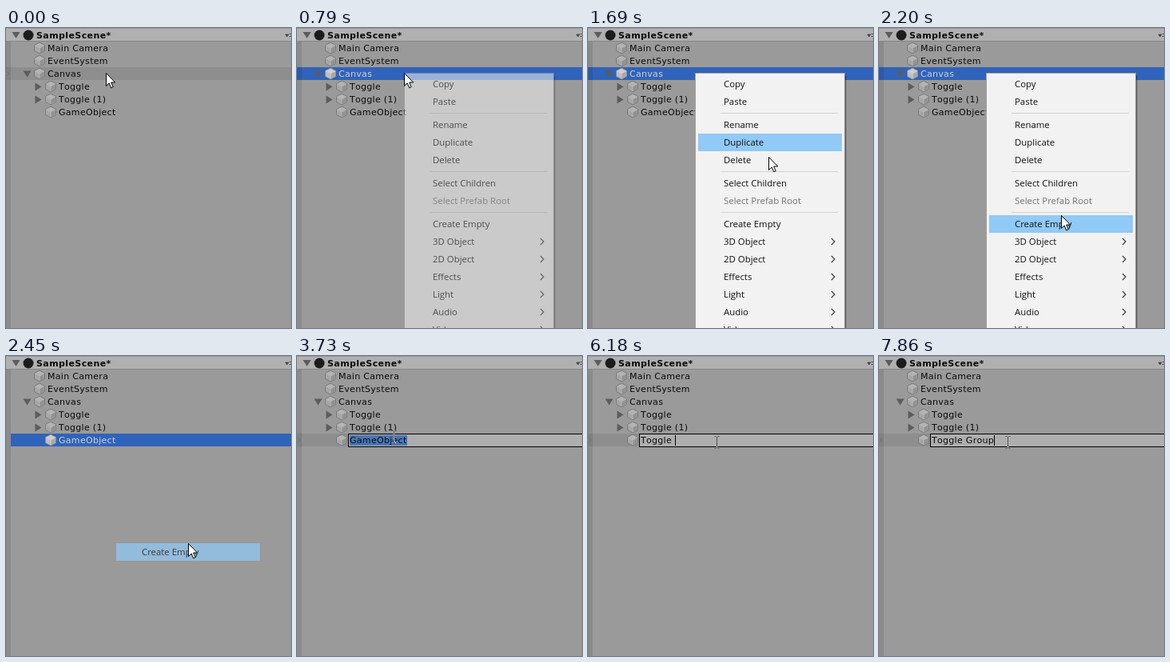
Write an HTML page that moves like this. It is 357x375 px and loops after 8 s.

```html
<!DOCTYPE html>
<html lang="en">
<head>
<meta charset="utf-8">
<title>Creating a toggle group</title>
<style>
  html, body { margin: 0; width: 100%; height: 100%; overflow: hidden; background: #9a9a9a; }
  #stage { position: relative; width: 357px; height: 375px; overflow: hidden; background: #9a9a9a; isolation: isolate; }
  svg { position: absolute; left: 0; top: 0; }
  #tree, #field { font: 11px "DejaVu Sans", sans-serif; letter-spacing: .3px; font-kerning: none; }
  #tree .scene { font-weight: bold; letter-spacing: .4px; }
  #menu { font: 11.4px "Open Sans", sans-serif; }
  #field {
    position: absolute; left: 64px; top: 97px; width: 300px; height: 15px;
    border: 1px solid #000; background: #aeaeae; color: #0a0a0a;
    white-space: pre; line-height: 15px;
  }
  #field span { position: absolute; left: 1px; top: 1px; height: 13px; line-height: 14px; }
  #field .picked { background: #4a78b6; }
  #field .typed { border-right: 1px solid #000; }
  #ibeam { mix-blend-mode: difference; }
</style>
</head>
<body>
<div id="stage">
  <svg id="tree" width="357" height="375"></svg>
  <div id="field"><span></span></div>
  <svg id="menu" width="357" height="375"></svg>
  <svg id="ibeam" width="357" height="375">
    <path d="M-3 -7.5H-1M1 -7.5H3M0 -7V7M-3 7.5H-1M1 7.5H3" transform="translate(.5 0)" fill="none" stroke="#fff"/>
  </svg>
  <svg id="arrow" width="357" height="375">
    <path d="M.5 .5V16.5L4.2 13L6.7 18.8L9.2 17.7L6.7 12H11.7Z" fill="#fff" stroke="#000" stroke-linejoin="round"/>
  </svg>
</div>
<script>
const $ = id => document.getElementById(id);
const LOOP = 8000;
const ROW = 16, TOP = 17;
const rowTop = i => TOP + ROW * i;

// Timelines: [start ms, value...]; each value holds until the next entry.
const pointer = [
  [0, 125, 56], [250, 120, 56], [370, 115, 56], [520, 124, 56], [640, 134, 56],
  [910, 137, 58], [1030, 142, 61], [1150, 190, 160], [1270, 240, 294], [1420, 240, 278],
  [1570, 233, 202], [1690, 226, 161], [1840, 226, 182], [1960, 227, 222], [2080, 229, 259],
  [2200, 228, 234], [2750, 121, 81], [2900, 121, 90], [3020, 121, 99],
  [3730, 121, 101], [3880, 135, 108], [4030, 159, 108], [4180, 161, 108]
];
const hoverRow = [[0, 2], [2450, -1], [2600, 4], [2900, 5]];
const selectedRow = [[0, -1], [520, 2], [2450, 5], [3730, -1]];
const menuAlpha = [[0, 0], [790, .55], [910, 1], [2450, 0]];
const menuPick = [
  [0, ''], [1030, 'Copy'], [1150, 'Duplicate'], [1270, '2D Object'], [1570, 'Select Children'],
  [1690, 'Duplicate'], [1840, 'Delete'], [1960, 'Select Prefab Root'], [2080, '3D Object'], [2200, 'Create Empty']
];
const typing = [
  [0, 0], [4990, 1], [5110, 2], [5260, 4], [5380, 5], [5530, 6], [6180, 7],
  [6460, 8], [6710, 9], [6990, 10], [7580, 11], [7860, 12]
];
const RENAME = 3730, NAME = 'Toggle Group';

const at = (line, t) => line.findLast(step => step[0] <= t).slice(1);

// Hierarchy
const rows = [
  ['Main Camera', 52, ''], ['EventSystem', 52, ''], ['Canvas', 52, 'down'],
  ['Toggle', 66, 'right'], ['Toggle (1)', 66, 'right'], ['GameObject', 66, '']
];
const rect = (x, y, w, h, fill, more = '') =>
  `<rect x="${x}" y="${y}" width="${w}" height="${h}" fill="${fill}" ${more}/>`;
const text = (x, y, s, more = '') => `<text x="${x}" y="${y}" ${more}>${s}</text>`;
const fold = (x, y, dir) => dir === 'down'
  ? `<path d="M${x - 5} ${y - 4}h10l-5 8z" fill="#5c5c5c"/>`
  : `<path d="M${x - 4} ${y - 5}v10l8 -5z" fill="#5c5c5c"/>`;
const cube = (x, y) => `<g class="cube" transform="translate(${x} ${y})" stroke-linejoin="round">
  <path d="M0 -7L6.5 -3.5V3.5L0 7L-6.5 3.5V-3.5Z" fill="#a6a6a6" stroke="#7c7c7c"/>
  <path d="M0 -6L5.5 -3.2L0 -.3L-5.5 -3.2Z" fill="#b4b4b4"/>
  <path d="M0 0L5.8 -3V3.1L0 6.2Z" fill="#929292"/>
  <path d="M-5.5 -3L0 0L5.5 -3M0 0V6" fill="none" stroke="#bababa" stroke-width=".8"/></g>`;

$('tree').innerHTML =
  rect(0, 0, 6, 375, '#8b8b8b') +
  rect(0, 0, 357, 17, '#b0b0b0') + rect(0, 16, 357, 1, '#868686') + rect(0, 0, 357, 1, '#979797') +
  fold(12.5, 9, 'down') + '<circle cx="28" cy="9" r="6.5" fill="#1c1c1c"/>' +
  text(38, 13, 'SampleScene*', 'class="scene" fill="#0a0a0a"') +
  '<path d="M350 8h4l-2 3zM354.5 7.5h3M354.5 10.5h3" fill="#444" stroke="#444" stroke-width=".8"/>' +
  `<g id="hover">${rect(0, 0, 6, ROW, '#808080')}${rect(6, 0, 351, ROW, '#8e8e8e', 'id="hoverFill"')}
    <path d="M1.5 5.5L4 8L1.5 10.5" fill="none" stroke="#6c6c6c"/></g>` +
  `<g id="select">${rect(0, 0, 6, ROW, '#2c59a8', 'id="selectEdge"')}${rect(6, 0, 351, ROW, '#3063bb')}</g>` +
  rows.map(([name, x, dir], i) => {
    const y = rowTop(i);
    return `<g class="row">${dir ? fold(x - 25.5, y + 8.5, dir) : ''}${cube(x - 10, y + 8)}${text(x, y + 12, name)}</g>`;
  }).join('');
const rowNodes = [...document.querySelectorAll('.row')];

// Context menu: '-' is a separator, '>' marks a submenu, '!' a disabled entry
const entries = ['Copy', 'Paste', '-', 'Rename', 'Duplicate', 'Delete', '-', 'Select Children',
  '!Select Prefab Root', '-', 'Create Empty', '>3D Object', '>2D Object', '>Effects', '>Light', '>Audio', '>Video'];
const itemY = {};
let y = 59, labels = '', lines = '';
for (const entry of entries) {
  if (entry === '-') {
    lines += rect(166, y + 3, 147, 1, '#d2d2d2');
    y += 7;
    continue;
  }
  const name = entry.replace(/^[>!]/, '');
  itemY[name] = y;
  labels += `<g data-name="${name}">${text(170, y + 15, name, `fill="${entry[0] === '!' ? '#707070' : '#101010'}"`)}`;
  if (entry[0] === '>') labels += `<path d="M305 ${y + 7}l4 4l-4 4" fill="none" stroke="#333" stroke-width="1.1"/>`;
  labels += '</g>';
  y += 22;
}
$('menu').innerHTML =
  `<g id="panel">${rect(138, 60, 186, 330, '#000', 'opacity=".18"')}${rect(137, 59, 186, 330, '#000', 'opacity=".25"')}
    ${rect(134.5, 56.5, 187, 330, '#f2f2f2', 'stroke="#a2a2a2"')}${lines}</g>` +
  rect(138, 0, 180, 22, '#91c9f7', 'id="pick"') + `<g id="labels">${labels}</g>`;
const labelNodes = [...$('labels').children];

const show = (node, on) => { node.style.display = on ? '' : 'none'; };
const place = (node, x, y) => node.setAttribute('transform', `translate(${x} ${y})`);

function drawTree(t) {
  const [hover] = at(hoverRow, t), [selected] = at(selectedRow, t);
  const renaming = t >= RENAME;
  show($('hover'), hover >= 0);
  show($('hoverFill'), hover === 2 || renaming);
  place($('hover'), 0, rowTop(hover));
  show($('select'), selected >= 0);
  show($('selectEdge'), selected === 2);
  place($('select'), 0, rowTop(selected));
  rowNodes.forEach((node, i) => {
    node.lastChild.setAttribute('fill', i === selected ? '#d2d2d2' : '#0a0a0a');
    node.querySelector('.cube').style.filter = i === selected ? 'brightness(1.15)' : '';
  });
}

function drawField(t) {
  const [count] = at(typing, t);
  const span = $('field').firstChild;
  show($('field'), t >= RENAME);
  span.className = count ? 'typed' : 'picked';
  span.textContent = count ? NAME.slice(0, count) : 'GameObject';
}

function drawMenu(t) {
  const [alpha] = at(menuAlpha, t), [pick] = at(menuPick, t);
  const closing = t >= 2450 && t < 2600;
  show($('menu'), alpha > 0 || closing);
  $('menu').style.opacity = closing ? .7 : alpha;
  show($('panel'), !closing);
  show($('pick'), pick);
  if (pick) $('pick').setAttribute('y', itemY[pick]);
  labelNodes.forEach(node => show(node, !closing || node.dataset.name === pick));
}

function drawPointer(t) {
  const [x, y] = at(pointer, t);
  const text = t >= RENAME;
  show($('arrow'), !text);
  show($('ibeam'), text);
  place($(text ? 'ibeam' : 'arrow').firstElementChild, text ? x + .5 : x, y);
}

function frame() {
  const t = performance.now() % LOOP;
  drawTree(t);
  drawField(t);
  drawMenu(t);
  drawPointer(t);
  requestAnimationFrame(frame);
}
frame();
</script>
</body>
</html>
```
